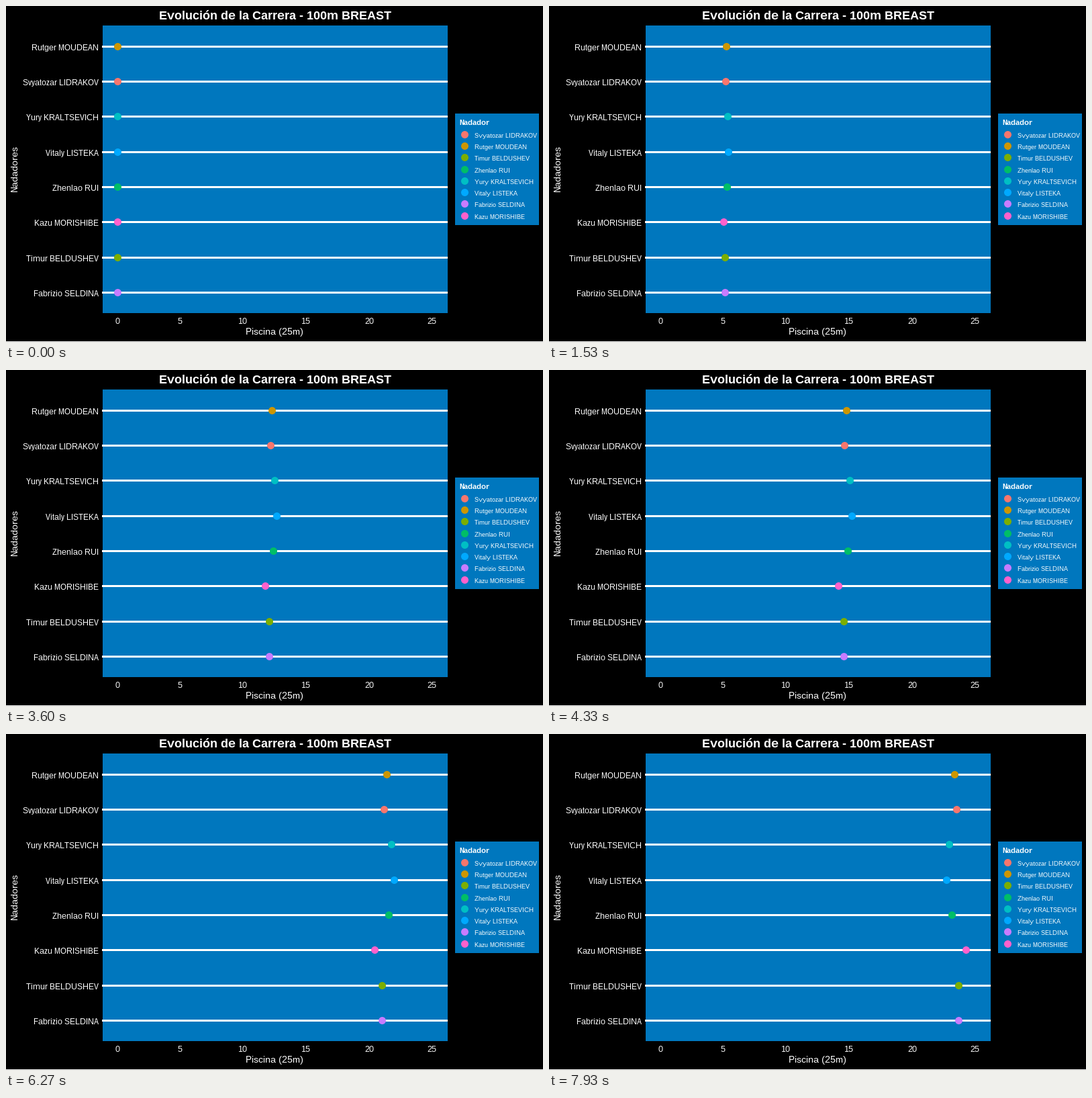
Write a matplotlib script that moves like this. It is 800 by 500 pixels and loops after 8 s.

```python
import math

import matplotlib.pyplot as plt
from matplotlib.animation import FuncAnimation
from matplotlib.patches import Circle, Rectangle

W, H, DPI = 800, 500, 100
STEPS, LOOP_MS = 120, 8000
SUB = 3  # drawn frames per motion step
START_X, WALL_X = 166.4, 634.9
POOL = "#0077BE"

# lane order: name, colour, step of the turn, speed after it (px per step)
SWIMMERS = [
    ("Rutger MOUDEAN", "#CD9600", 109.8, 3.31),
    ("Svyatozar LIDRAKOV", "#F8766D", 110.9, 3.38),
    ("Yury KRALTSEVICH", "#00BFC4", 107.9, 3.46),
    ("Vitaly LISTEKA", "#00A9FF", 106.9, 3.50),
    ("Zhenlao RUI", "#00BE67", 109.0, 3.44),
    ("Kazu MORISHIBE", "#FF61CC", 115.0, 3.35),
    ("Timur BELDUSHEV", "#7CAE00", 111.7, 3.34),
    ("Fabrizio SELDINA", "#C77CFF", 111.7, 3.34),
]
LEGEND_ORDER = [1, 0, 6, 4, 2, 3, 7, 5]

# crisp, grid-fitted lettering without kerning
plt.rcParams.update({
    "font.family": "Liberation Sans",
    "text.hinting": "native",
    "text.hinting_factor": 1,
    "text.kerning_factor": 6,
})
fig = plt.figure(figsize=(W / DPI, H / DPI), dpi=DPI, facecolor="black")
ax = fig.add_axes([0, 0, 1, 1])
ax.set_xlim(0, W)
ax.set_ylim(H, 0)
ax.axis("off")


def rect(x0, y0, x1, y1, color):
    ax.add_patch(Rectangle((x0, y0), x1 - x0, y1 - y0, fc=color, lw=0,
                           antialiased=False))


def dot(x, y, color):
    return ax.add_patch(Circle((x, y), 5.5, fc=color, lw=0, zorder=3))


def label(x, y, text, px, ha="center", **kw):
    ax.text(x, y, text, fontsize=px * 72 / DPI, color="white", ha=ha,
            va="baseline", **kw)


def pixel(v):
    return math.floor(v) + 0.5


def lane_y(i):
    return pixel(60.3 + 52.3 * i)


def swim_x(step, turn, back):
    if step <= turn:
        return START_X + (WALL_X - START_X) * step / turn
    return WALL_X - back * (step - turn)


# pool and axes
rect(0, 499, W, H, "white")
rect(144, 29, 658, 457, POOL)
for i, (name, *_) in enumerate(SWIMMERS):
    y = lane_y(i)
    rect(143, y - 1.5, 658, y + 1.5, "white")
    label(138, y + 5.5, name, 12, ha="right")
for k in range(6):
    label(165.7 + 93.8 * k, 473, str(5 * k), 12)

label(400.5, 20, "Evolución de la Carrera - 100m BREAST", 18, weight="bold")
label(400, 489, "Piscina (25m)", 14)
label(17, 241, "Nadadores", 14, rotation=90, rotation_mode="anchor")

# legend
rect(669, 160, 794, 326, POOL)
label(675, 177, "Nadador", 11, ha="left", weight="bold")
for row, i in enumerate(LEGEND_ORDER):
    y = pixel(191.3 + 17.28 * row)
    dot(683.5, y, SWIMMERS[i][1])
    label(698, y + 4.5, SWIMMERS[i][0], 9, ha="left")

dots = [dot(START_X, lane_y(i), s[1]) for i, s in enumerate(SWIMMERS)]


def update(frame):
    step = (frame + 1) // SUB % STEPS
    for i, (d, (_, _, turn, back)) in enumerate(zip(dots, SWIMMERS)):
        d.set_center((pixel(swim_x(step, turn, back)), lane_y(i)))
    return dots


anim = FuncAnimation(fig, update, frames=STEPS * SUB,
                     interval=LOOP_MS / (STEPS * SUB),
                     repeat=True, repeat_delay=0)
plt.show()
```
